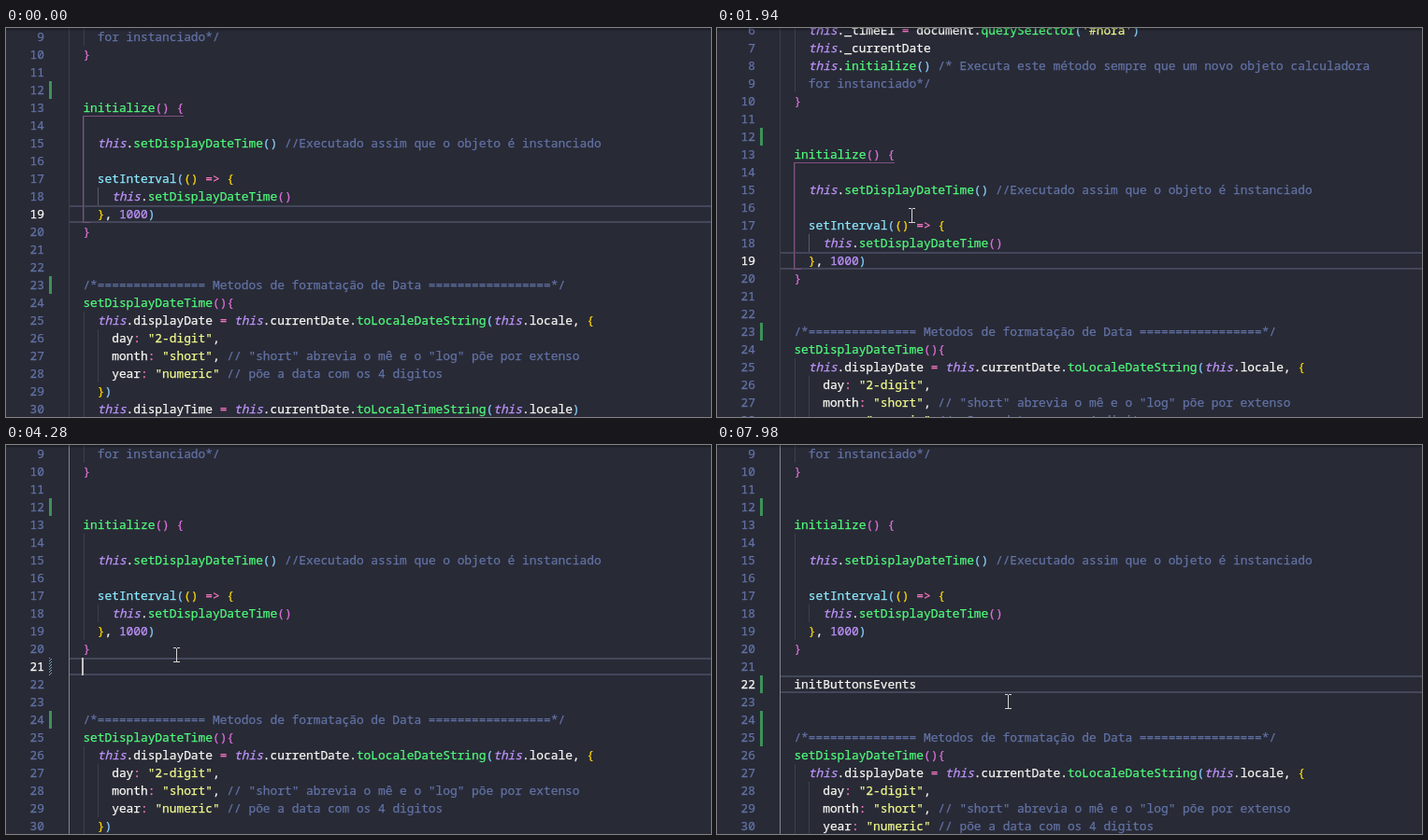
Recreate the animation shown at these times as an HTML page with a canvas. Size 754x417 px, loop 8000 ms.

```html
<!DOCTYPE html>
<html lang="pt">
<head>
<meta charset="utf-8">
<style>
html, body { margin: 0; width: 100%; height: 100%; overflow: hidden; background: #282a36; }
canvas { display: block; }
</style>
</head>
<body>
<canvas id="stage" width="754" height="417"></canvas>
<script>
const ctx = document.getElementById('stage').getContext('2d');
const W = 754, H = 417, LOOP = 8000;
const ROW = 19, CHAR = 7.698, LEFT = 67, FIRST = 3;
const FONT = '500 12.83px "Noto Sans Mono", "DejaVu Sans Mono", monospace';
const C = {
  bg: '#282a36', text: '#f8f8f2', comment: '#6272a4', pink: '#ff79c6', green: '#50fa7b',
  cyan: '#8be9fd', purple: '#bd93f9', yellow: '#f1fa8c', border: '#44475a', added: '#3c9258',
  scope: '#815080', guide: '#3d3f4a', innerGuide: '#5a5c66', activeGuide: '#84858c'
};
const BRACKETS = ['#ffd700', '#da70d6', '#87cefa'];

// Leading spaces also decide the indent guides, on blank lines too.
const upper = `    this.locale = 'pt-BR'
    this._displayCalcEL = document.querySelector('#display')
    this._dateEl = document.querySelector('#data')
    this._timeEl = document.querySelector('#hora')
    this._currentDate
    this.initialize() /* Executa este método sempre que um novo objeto calculadora
    for instanciado*/
  }
  
  
  initialize() {
    
    this.setDisplayDateTime() //Executado assim que o objeto é instanciado
    
    setInterval(() => {
      this.setDisplayDateTime()
    }, 1000)
  }`.split('\n');
const lower = `  /*${'='.repeat(15)} Metodos de formatação de Data ${'='.repeat(17)}*/
  setDisplayDateTime(){
    this.displayDate = this.currentDate.toLocaleDateString(this.locale, {
      day: "2-digit",
      month: "short", // "short" abrevia o mê e o "log" põe por extenso
      year: "numeric" // põe a data com os 4 digitos
    })
    this.displayTime = this.currentDate.toLocaleTimeString(this.locale)`.split('\n');

const CLICK = 3050, ENTER1 = 4280, ENTER2 = 4480, PASTE = 7230;
const SCROLL = [[0, 152], [700, 102], [800, 52], [1940, 102], [2010, 152]];
const POINTER = [
  [60, 562, 353], [210, 200, 216], [410, 200, 216], [1070, 208, 201], [2410, 208, 201],
  [2680, 185, 203], [2840, 185, 203], [3190, 187, 211], [3520, 187, 211], [3640, 182, 225],
  [PASTE, 182, 225], [7600, 379, 302], [7980, 311, 275]
];
// [from, to, line, column]
const CARET = [
  [CLICK, 3540, 20, 3], [4050, ENTER1, 20, 3], [ENTER1, ENTER2, 21, 2], [ENTER2, 5040, 22, 2],
  [5520, 6010, 22, 2], [6490, 7000, 22, 2], [PASTE, 7730, 22, 19]
];

const stepAt = (steps, t) => steps.filter(s => s[0] <= t).pop()[1];
const colX = col => LEFT + col * CHAR;
const guideX = col => Math.round(colX(col) + 0.3);

function pointerAt(t) {
  const i = POINTER.findIndex(p => p[0] > t);
  if (i === 0) return null;
  if (i < 0) return POINTER[POINTER.length - 1].slice(1);
  const [t0, x0, y0] = POINTER[i - 1], [t1, x1, y1] = POINTER[i];
  let k = (t - t0) / (t1 - t0);
  k = k * k * (3 - 2 * k);
  return [x0 + (x1 - x0) * k, y0 + (y1 - y0) * k];
}

function rect(x, y, w, h, color) {
  ctx.fillStyle = color;
  ctx.fillRect(x, y, w, h);
}

// A hairline stroke gives the text its slightly heavy screen weight.
function write(text, x, y, color, italic) {
  ctx.font = (italic ? 'italic ' : '') + FONT;
  ctx.fillStyle = ctx.strokeStyle = color;
  ctx.lineWidth = 0.25;
  ctx.fillText(text, x, y + 14);
  ctx.strokeText(text, x, y + 14);
}

function tokenColor(token, next) {
  if (/^\/[/*]|\*\/$/.test(token)) return C.comment;
  if (/^['"]/.test(token)) return C.yellow;
  if (token === 'this' || /^\d/.test(token)) return C.purple;
  if (/^[=:]/.test(token)) return C.pink;
  if (next === '(' && /^\w/.test(token)) return token === 'setInterval' ? C.cyan : C.green;
  return C.text;
}

// Draws one code line and returns the bracket depth after it.
function drawCode(line, y, depth) {
  for (const m of line.matchAll(/\/[/*].*|\w[^*]*\*\/|".*?"|'.*?'|\w+|=>|[^\s\w]/g)) {
    const token = m[0];
    let color = tokenColor(token, line[m.index + token.length]);
    if (/^[({]$/.test(token)) color = BRACKETS[depth++ % 3];
    if (/^[)}]$/.test(token)) color = BRACKETS[--depth % 3];
    write(token, colX(m.index), y, color, token === 'this');
  }
  return depth;
}

function drawHatch(y) {
  ctx.save();
  ctx.beginPath();
  ctx.rect(46, y, 3, ROW);
  ctx.clip();
  ctx.strokeStyle = '#6fa9b4';
  ctx.lineWidth = 1;
  ctx.beginPath();
  for (let i = -3; i < ROW + 3; i += 3) {
    ctx.moveTo(45, y + i + 5);
    ctx.lineTo(50, y + i);
  }
  ctx.stroke();
  ctx.restore();
}

function drawPointer(x, y) {
  x = Math.round(x);
  y = Math.round(y);
  const color = '#d4d4d4';
  rect(x, y - 7, 1, 15, color);
  for (const edge of [y - 8, y + 7]) {
    rect(x - 3, edge, 3, 1, color);
    rect(x + 1, edge, 3, 1, color);
  }
}

function marksAt(t) {
  if (t < ENTER1) return { added: [12, 23] };
  if (t < ENTER2) return { added: [12, 24], pending: 21 };
  if (t < 4780) return { added: [12, 24, 25], pending: 21 };
  if (t < 7500) return { added: [12, 23, 24, 25], pending: 22 };
  return { added: [12, 22, 24, 25] };
}

function draw(t) {
  const scroll = stepAt(SCROLL, t);
  const top = n => (n - 1) * ROW - scroll;
  const active = stepAt([[0, 19], [CLICK, 20], [ENTER1, 21], [ENTER2, 22]], t);
  const clicked = t >= CLICK;
  const blanks = Array(2 + (t >= ENTER1) + (t >= ENTER2)).fill('  ');
  if (t >= PASTE) blanks[1] = '  initButtonsEvents';
  const lines = [...upper, ...blanks, ...lower];

  rect(0, 0, W, H, C.bg);
  rect(67, top(active), W, 2, C.border);
  rect(67, top(active) + ROW - 2, W, 2, C.border);
  rect(67, top(active), 1, ROW, C.border);

  let depth = 2;
  lines.forEach((line, i) => {
    const n = i + FIRST, y = top(n);
    const levels = line.match(/^ */)[0].length / 2;
    for (let g = 0; g < levels; g++) {
      const inner = !clicked && g === 2 && n === 18;
      rect(guideX(g * 2), y, 1, ROW, clicked && g === 0 ? C.activeGuide : inner ? C.innerGuide : C.guide);
    }
    const label = String(n);
    write(label, 41 - label.length * CHAR, y, n === active ? C.text : C.comment);
    depth = drawCode(line, y, depth);
  });

  if (!clicked) {
    rect(82, top(14) - 1, 108, 1, C.scope);
    rect(82, top(14) - 1, 1, 115, C.scope);
    rect(82, top(20) - 1, 8, 1, C.scope);
  } else if (t < ENTER1) {
    ctx.strokeStyle = '#888888';
    ctx.lineWidth = 1;
    for (const [n, col] of [[13, 15], [20, 2]])
      ctx.strokeRect(Math.floor(colX(col)) + 0.5, top(n) + 0.5, 7, ROW - 1);
  }

  const marks = marksAt(t);
  marks.added.forEach(n => rect(46, top(n), 3, ROW, C.added));
  if (marks.pending) drawHatch(top(marks.pending));

  const caret = CARET.find(([from, to]) => t >= from && t < to);
  if (caret) {
    const [, , n, col] = caret;
    rect(Math.floor(colX(col)) - 1, top(n), 2, ROW, t >= ENTER2 && t < 5040 ? '#c080b0' : '#c4c4c0');
  }

  const shadow = ctx.createLinearGradient(0, 0, 0, 4);
  shadow.addColorStop(0, 'rgba(0,0,0,.35)');
  shadow.addColorStop(1, 'rgba(0,0,0,0)');
  rect(0, 0, W, 4, shadow);

  const pointer = pointerAt(t);
  if (pointer) drawPointer(...pointer);
}

function tick() {
  draw(performance.now() % LOOP);
  requestAnimationFrame(tick);
}
tick();
</script>
</body>
</html>
```
